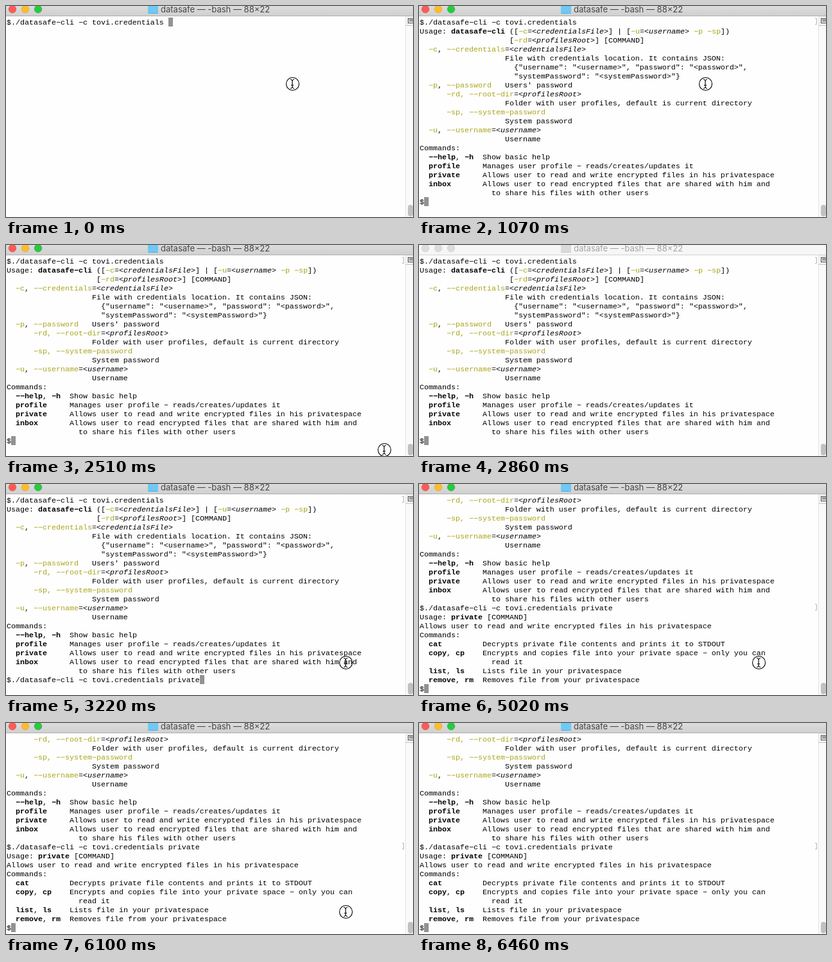
These frames come from a looping animation (634 by 329 pixels, 7170 ms). An HTML page with a canvas:

```html
<!DOCTYPE html>
<html lang="en">
<head>
<meta charset="utf-8">
<title>datasafe-cli</title>
<style>
html, body { margin: 0; width: 100%; height: 100%; overflow: hidden; background: #fff; }
canvas { display: block; }
</style>
</head>
<body>
<canvas id="stage" width="634" height="329"></canvas>
<script>
const ctx = document.getElementById('stage').getContext('2d');
const LOOP = 7170, CELL = 7, ROW = 14, LEFT = 1, TOP = 18;
const MONO = '11.665px "Liberation Mono", "DejaVu Sans Mono", monospace';
const COMMAND = '$./datasafe-cli -c tovi.credentials ';

// Markup: *bold*, ~olive~, _italic_
const HELP = [
  'Usage: *datasafe-cli* ([~-c~=_<credentialsFile>_] | [~-u~=_<username>_ ~-p~ ~-sp~])',
  '                    [~-rd~=_<profilesRoot>_] [COMMAND]',
  '  ~-c~, ~--credentials~=_<credentialsFile>_',
  '                   File with credentials location. It contains JSON:',
  '                     {"username": "<username>", "password": "<password>",',
  '                     "systemPassword": "<systemPassword>"}',
  '  ~-p~, ~--password~   Users\' password',
  '      ~-rd, --root-dir~=_<profilesRoot>_',
  '                   Folder with user profiles, default is current directory',
  '      ~-sp, --system-password~',
  '                   System password',
  '  ~-u~, ~--username~=_<username>_',
  '                   Username',
  'Commands:',
  '  *--help*, *-h*  Show basic help',
  '  *profile*     Manages user profile - reads/creates/updates it',
  '  *private*     Allows user to read and write encrypted files in his privatespace',
  '  *inbox*       Allows user to read encrypted files that are shared with him and',
  '                to share his files with other users'
];
const PRIVATE_HELP = [
  'Usage: *private* [COMMAND]',
  'Allows user to read and write encrypted files in his privatespace',
  'Commands:',
  '  *cat*         Decrypts private file contents and prints it to STDOUT',
  '  *copy*, *cp*    Encrypts and copies file into your private space - only you can',
  '                read it',
  '  *list*, *ls*    Lists file in your privatespace',
  '  *remove*, *rm*  Removes file from your privatespace'
];

const typed = COMMAND + 'private';
const listing = [COMMAND, ...HELP];
const screens = [
  { from: 0, lines: [COMMAND] },
  { from: 1070, lines: [...listing, '$'], mark: 0 },
  { from: 3220, lines: [...listing, typed], mark: 0 },
  { from: 5020, lines: [...listing.slice(8), typed, ...PRIVATE_HELP, '$'], mark: 12 }
];
const pointers = [
  { from: 0, x: 446.5, y: 121.5 },
  { from: 2510, x: 589.5, y: 319.5 },
  { from: 2860 },
  { from: 3220, x: 529.5, y: 278.5 },
  { from: 6100, x: 529.5, y: 294.5 },
  { from: 6460 }
];

const at = (steps, t) => steps.filter(s => s.from <= t).pop();

function rect(x, y, w, h, fill) {
  ctx.fillStyle = fill;
  ctx.fillRect(x, y, w, h);
}

function rounded(x, y, w, h, r, fill) {
  ctx.beginPath();
  ctx.roundRect(x, y, w, h, r);
  ctx.fillStyle = fill;
  ctx.fill();
}

function disc(x, y, r, fill, edge) {
  ctx.beginPath();
  ctx.arc(x, y, r, 0, 7);
  ctx.fillStyle = fill;
  ctx.fill();
  ctx.strokeStyle = edge;
  ctx.lineWidth = 0.6;
  ctx.stroke();
}

function line(points, color, width = 1) {
  ctx.beginPath();
  points.forEach(([x, y]) => ctx.lineTo(x, y));
  ctx.strokeStyle = color;
  ctx.lineWidth = width;
  ctx.stroke();
}

// Draws one marked-up row on the character grid and returns its length.
function drawRow(text, row) {
  let col = 0, style = '';
  for (const part of text.split(/([*~_])/)) {
    if (/^[*~_]$/.test(part)) {
      style = style ? '' : part;
      continue;
    }
    const face = style === '*' ? 'bold ' : style === '_' ? 'italic ' : '';
    ctx.font = face + MONO;
    ctx.fillStyle = style === '~' ? '#aaa61c' : '#000';
    // The terminal face has wide dashes
    ctx.fillText(part.replace(/-/g, '\u2212'), LEFT + col * CELL, TOP + row * ROW + 11);
    col += part.length;
  }
  return col;
}

function drawTerminal({ lines, mark }) {
  const last = lines.length - 1;
  lines.forEach((text, row) => {
    const plain = text.replace(/[*~_]/g, '');
    if (row === last) rect(LEFT + plain.length * CELL, TOP + row * ROW, CELL, ROW, '#929292');
    drawRow(text, row);
  });
  if (mark !== undefined) {
    const y = TOP + mark * ROW + 1.5;
    line([[617, y], [619.5, y], [619.5, y + 9], [617, y + 9]], '#b4b4b4');
  }
}

function drawTitleBar(active) {
  const shade = ctx.createLinearGradient(0, 0, 0, 15);
  shade.addColorStop(0, active ? '#dcdcdc' : '#f6f6f6');
  shade.addColorStop(1, active ? '#d0d0d0' : '#f6f6f6');
  rect(0, 0, 634, 15, shade);
  rect(0, 15, 634, 1, active ? '#b0b0b0' : '#d2d2d2');

  const lights = active
    ? [['#fc5b57', '#df4744'], ['#fdbc2e', '#dd9f24'], ['#29c940', '#1dab2d']]
    : Array(3).fill(['#dcdcdc', '#cacaca']);
  lights.forEach(([fill, edge], i) => disc(10 + i * 20, 5, 5.8, fill, edge));

  rounded(221, -3, 8, 6, 1, active ? '#58b5e6' : '#cfcfcf');
  rounded(221, -1, 16, 13, 1, active ? '#6fc8f6' : '#dadada');
  rect(222, 11, 14, 1, active ? '#55b0e0' : '#cccccc');

  ctx.font = '13px Inter, Roboto, sans-serif';
  ctx.fillStyle = active ? '#454545' : '#a3a3a3';
  ctx.fillText('datasafe \u2014 -bash \u2014 88\u00d722', 241, 10);
}

function drawScrollBar() {
  rect(622, 16, 12, 313, '#fafafa');
  rect(622, 16, 1, 313, '#e4e4e4');
  rect(623, 16, 11, 14, '#f1f1f1');
  rect(622, 30, 12, 1, '#c8c8c8');
  ctx.strokeStyle = '#4a4a4a';
  ctx.lineWidth = 1;
  ctx.strokeRect(626.5, 19.5, 9, 7);
  line([[628, 21.5], [634, 21.5]], '#4a4a4a');
  line([[628, 23.5], [634, 23.5]], '#4a4a4a');
  rounded(626, 310, 8, 18, 4, '#c1c1c1');
}

function drawPointer({ x, y }) {
  if (x === undefined) return;
  ctx.beginPath();
  ctx.arc(x, y, 10, 0, 7);
  ctx.strokeStyle = '#000';
  ctx.lineWidth = 1.1;
  ctx.stroke();
  for (const s of [-1, 1]) {
    line([[x - 3.5, y + s * 7], [x - 1.5, y + s * 6.6], [x - 0.5, y + s * 5],
          [x + 0.5, y + s * 6.6], [x + 2.5, y + s * 7]], '#000');
  }
  line([[x - 0.5, y - 5.5], [x - 0.5, y + 5.5]], '#000', 1.2);
  line([[x - 2.5, y + 2], [x + 1.5, y + 2]], '#000');
}

function draw(t) {
  rect(0, 0, 634, 329, '#fefefe');
  drawTerminal(at(screens, t));
  drawScrollBar();
  drawTitleBar(t < 2860 || t >= 3220);
  drawPointer(at(pointers, t));
}

const start = performance.now();
function tick() {
  draw((performance.now() - start) % LOOP);
  requestAnimationFrame(tick);
}
tick();
</script>
</body>
</html>
```
